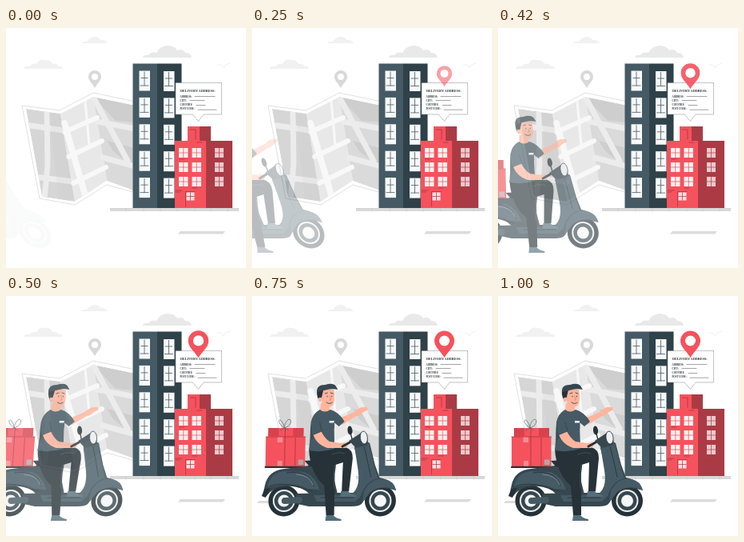
Animation, 300 px wide and 300 px high, one loop 1.04 s. Source, as an HTML page:

```html
<!DOCTYPE html>
<html lang="en">
<head>
<meta charset="utf-8">
<title>Delivery scooter</title>
<style>
  html, body { margin: 0; width: 100%; height: 100%; overflow: hidden; background: #fff; }
  svg { display: block; width: 100vw; height: 100vh; }
  text { font: bold 3px "Liberation Serif", "Noto Serif", serif; fill: #263238; }
  .line { fill: none; stroke-linecap: round; stroke-linejoin: round; }
</style>
</head>
<body>
<svg viewBox="0 0 300 300">
  <!-- sky -->
  <path fill="#f1f1f1" d="M22 51Q24 47 30 48Q33 43 38 45Q42 38 49 40Q56 40 58 45Q63 43 66 48Q70 47 71 51Z"/>
  <path fill="#f1f1f1" d="M94 19Q97 16 101 17Q105 11 111 11Q116 11 118 15Q123 14 127 19Z"/>
  <path fill="#e9e9e9" d="M171 37Q172 33 178 34Q181 29 188 31Q192 23 201 22Q211 22 214 28Q221 25 224 31Q231 31 232 37Z"/>
  <path class="line" stroke="#eee" stroke-width=".9" d="M264 46Q270 45 272 50Q274 45 280 44"/>

  <!-- map -->
  <path fill="#fff" stroke="#d9d9d9" stroke-width=".8" d="M20 97L67 103L109 81L162 92V206L126 196L86 221L42 213Z"/>
  <clipPath id="sheet"><path d="M25 101L68 107L109 86L162 97V204L126 191L86 217L45 211Z"/></clipPath>
  <g clip-path="url(#sheet)">
    <path fill="#d6d6d6" d="M25 101L68 107L86 217L45 211Z"/>
    <path fill="#e8e8e8" d="M68 107L109 86L126 191L86 217Z"/>
    <path fill="#dadada" d="M109 86L162 97V204L126 191Z"/>
    <path fill="#cecece" d="M109 86L162 97V118L137 116ZM126 141L160 150V175L134 154Z"/>
    <g class="line" stroke="#ececec" stroke-width="7">
      <path d="M51 100L52 170L48 215M24 121L72 128M36 186L84 192M109 86L152 166M114 117L162 126M121 162L162 173"/>
    </g>
    <g class="line" stroke="#f8f8f8" stroke-width="6">
      <path d="M73 130L114 112M78 161L120 141M84 194L125 174"/>
      <path stroke-width="8" d="M73 119L99 209"/>
      <path stroke-width="3" d="M99 91L104 146"/>
    </g>
    <path fill="#bbb" fill-opacity=".14" d="M68 107L86 217L66 214L54 105Z"/>
  </g>
  <path fill="#d9d9d9" fill-rule="evenodd" d="M111 75C108 69 103 66 103 61A8 8 0 0 1 119 61C119 66 114 69 111 75ZM111 57A4 4 0 1 0 111 65A4 4 0 1 0 111 57"/>

  <!-- ground -->
  <path fill="#d9d9d9" d="M130 225.5H291V229H130Z"/>
  <path class="line" stroke="#bcbcbc" stroke-width=".5" d="M130 225.5H291M150 226V229M172 226V229M193 226V229M214 226V229M236 226V229M256 226V229M277 226V229"/>
  <path fill="#dcdcdc" d="M218 254H274L271 257.5H215Z"/>

  <!-- buildings -->
  <path fill="#455a64" d="M158.5 44.5H189V225H158.5Z"/>
  <path fill="#2f4149" d="M189 44.5H219.5V225H189Z"/>
  <path fill="#f5525d" d="M211 141H227V123H242V141H250V225H211Z"/>
  <path fill="#aa3b44" d="M242 123H256V141H283V225H250V141H242Z"/>
  <g id="windows"></g>
  <path class="line" stroke="#9c343d" stroke-width=".7" d="M230 127H237V139M239 143H245M224.5 223V204.500H236M212 203H220M212 205H217M217 164H223M233 200H239"/>

  <!-- address card -->
  <path fill="#fff" stroke="#777" stroke-width=".6" stroke-dasharray="1.5 .5" d="M212 68.500H269.500V108H247L240.500 116.500L233 108H212Z"/>
  <text x="218" y="80" style="font-size:4.2px">DELIVERY ADDRESS:</text>
  <text x="217.500" y="87">ADDRESS:</text>
  <text x="217.500" y="92">CITY:</text>
  <text x="217.500" y="97">COUNTRY:</text>
  <text x="217.500" y="102">POST CODE :</text>
  <path class="line" stroke="#666" stroke-width=".6" d="M236 85.500H261M230 90.500H248M238 96.500H249M240 102.200H263"/>

  <g id="pin">
    <path fill="#f5525d" fill-rule="evenodd" d="M240.500 77C236 69 228 64 228 56A12.500 12.500 0 0 1 253 56C253 64 245 69 240.500 77Z"/>
    <circle cx="240.500" cy="56" r="6.500" fill="#fff"/>
  </g>

  <g id="rider">
    <path fill="#dcdcdc" d="M10 256H70L68 259H7Z"/>
    <g id="wheels"></g>

    <!-- parcels -->
    <path fill="#f5525d" d="M17 176H66.500V213H17ZM20 165H64V176H20Z"/>
    <path fill="#d8424d" d="M20 165H33V175H20ZM51 165H64V175H51Z"/>
    <path fill="#f98a91" d="M31.500 176H38V183H31.500ZM32 206H38V213H32Z"/>
    <path fill="#b7a4a8" d="M58 204.500H64.500V211H58Z"/>
    <path class="line" stroke="#a8333d" stroke-width=".8" d="M17 176H66.500M41 165V213M54 177V213M17 213H66"/>
    <path class="line" stroke="#59636a" stroke-width=".7" d="M40 165C31 160 32 152 36 156Q39 159 40 165C40 157 46 151 48 156Q48 162 40 165L35 168M40 165L45 168"/>
    <path class="line" stroke="#263238" stroke-width="2" d="M17 214H70L74 211"/>

    <!-- scooter -->
    <path fill="#37474f" d="M55 247L105 246H128Q139 240 136 220L128 190L137 178L147 184L154 211L160 227Q177 230 181 243Q160 236 147 247L138 260Q135 263 126 263H72L58 260Z"/>
    <path fill="#455a64" d="M128 188L138 181L146 185L153 212L158 228Q143 231 137 250L130 257H82L78 249H122Q137 243 133 218Z"/>
    <path fill="#455a64" d="M141 244Q150 226 167 229Q178 231 181 243Q163 234 149 245L139 258Z"/>
    <path fill="#37474f" d="M14 250L17 236Q21 218 41 216L72 212H99L108 248H73Q62 236 43 238Q28 238 19 250Z"/>
    <path fill="#455a64" d="M20 240Q22 222 40 219L66 220Q80 226 85 242L70 241Q57 234 42 236Q28 236 20 240Z"/>
    <path class="line" stroke="#263238" stroke-width=".8" d="M20 239Q30 233 48 236L76 244M44 221Q73 217 78 238M140 188Q145 207 149 226M87 252H128"/>
    <path class="line" stroke="#839097" stroke-width=".9" d="M56 223Q73 224 77 236"/>
    <path fill="#263238" d="M13 250L17 241L24 240L18 252ZM66 206Q84 204 102 210L103 216L72 213Z"/>
    <path class="line" stroke="#455a64" stroke-width="8" d="M42 256L60 255"/>
    <path class="line" stroke="#263238" stroke-width="1.300" d="M123 172L126 184"/>
    <ellipse cx="122" cy="168" rx="3" ry="5.500" fill="#263238" transform="rotate(-8 122 168)"/>
    <path fill="#37474f" d="M121 181L130 175L139 169Q146 175 144 186L130 190Z"/>
    <ellipse cx="139.500" cy="177" rx="4.500" ry="8" fill="#edf1f2" stroke="#263238" stroke-width=".8" transform="rotate(-8 139.500 177)"/>

    <!-- far arm and leg -->
    <path fill="#ffb59d" d="M106 154L112 161L130 150Q135 149 137 146L144 142L143 139Q136 138 132 141L127 145Z"/>
    <path fill="#263238" d="M90 191L116 189Q126 191 126 203L122 244H113L114 208L92 215Z"/>
    <path fill="#546e7a" d="M112 244H121Q124 248 131 249V251H111Z"/>

    <!-- near leg -->
    <path fill="#263238" d="M71 191L103 189Q107 203 104 222V274H94L91 237Q73 222 71 191Z"/>
    <path class="line" stroke="#53626a" stroke-width=".6" d="M100 198Q109 194 116 197M104 211Q102 224 103 240"/>
    <path fill="#546e7a" d="M94 274H103Q106 278 113 279V281H93Z"/>

    <!-- body -->
    <path fill="#ffb59d" d="M85 134H96V145Q90 149 84 144Z"/>
    <path fill="#455a64" d="M84 142Q90 147 97 142Q108 145 115 157L108 163L102 158L103 191Q87 196 71 193L73 168Q71 149 84 142Z"/>
    <path fill="#3a4d56" d="M75 153Q71 166 73 181L84 170Z"/>
    <path fill="#ffb59d" d="M75 170L85 167Q90 178 97 182L112 184Q117 182 119 185Q121 188 116 190L94 190Q79 185 75 170Z"/>
    <path fill="#455a64" d="M73 157Q80 148 84 159L87 169L75 174Z"/>
    <path fill="#fff" d="M96 156H102V158.500H96Z"/>
    <path class="line" stroke="#263238" stroke-width="3" d="M113 188L122 183"/>
    <path class="line" stroke="#2d3c44" stroke-width=".6" d="M84 158L87 169L75 174M102 158V165"/>

    <!-- head -->
    <path fill="#ffb59d" d="M83 117H101Q103 128 101 135Q97 141 91 138Q84 135 83 117Z"/>
    <path fill="#263238" d="M80 117H88L86 126L84 132Q79 127 80 117Z"/>
    <circle cx="84" cy="129" r="2.300" fill="#ffb59d"/>
    <path fill="#37474f" d="M80 120Q79 111 90 111Q99 108 103 112L106 117Q98 115 89 118Z"/>
    <path class="line" stroke="#263238" stroke-width=".8" d="M90 122L93 121M97 121L100 122M93 125V126M98.500 125V126M92 133Q96 136 99 133"/>
    <path class="line" stroke="#d8745f" stroke-width=".7" d="M96 125L97.500 130H95.500"/>
  </g>
</svg>
<script>
const $ = id => document.getElementById(id);

const pane = (x, y, w, h, fill, bar) =>
  `<rect x="${x}" y="${y}" width="${w}" height="${h}" fill="${fill}"/>
   <path stroke="${bar}" stroke-width=".7" fill="none" d="M${x + w / 2} ${y}v${h}M${x} ${y + h / 2}h${w}"/>`;

const tallPane = (x, y) =>
  `<rect x="${x}" y="${y}" width="13.500" height="25" fill="#f8fafa"/>
   <path stroke="#455a64" stroke-width=".8" fill="none" d="M${x + 6.5} ${y + 1}v18M${x + 2} ${y + 9}h9M${x + 1} ${y + 18.5}h11"/>`;

let panes = "";
for (let i = 0; i < 5; i++) {
  const y = 53.5 + i * 33.4;
  panes += tallPane(166.5, y) + tallPane(197, y + .5);
}
for (let i = 0; i < 3; i++) {
  const y = 150 + i * 18;
  for (const x of [216, 232.5]) panes += pane(x, y, 11.5, 12, "#fff0f0", "#d94b55");
  panes += pane(261, y, 11, 12, "#ecc9cd", "#aa3b44");
}
$("windows").innerHTML = panes + pane(225.5, 205.5, 10, 10, "#fbe0e1", "#9c343d");

$("wheels").innerHTML = [41, 161.5].map(x =>
  [[19.5, "#263238"], [14, "#eceff0"], [12, "#37474f"], [7.5, "#f5f6f6"]].map(([r, fill]) =>
    `<circle cx="${x}" cy="256" r="${r}" fill="${fill}"/>`).join("")).join("");

const LOOP = 1040, STEP = 1000 / 24, PIVOT = 195;

// Linear interpolation through [time, value] pairs
function track(t, keys) {
  const i = keys.findIndex(k => k[0] > t);
  if (i < 0) return keys[keys.length - 1][1];
  const [t0, a] = keys[i - 1], [t1, b] = keys[i];
  return a + (b - a) * (t - t0) / (t1 - t0);
}

function draw(ms) {
  const t = Math.min(24, Math.floor((ms + 5.01) / STEP)) * STEP;

  // The rider rushes in leaning, then sways upright
  const enter = Math.max(.02, Math.min(1, t / 600) ** 1.3);
  const lean = t < 600 ? 20 - 30 * enter : track(t, [[600, -10], [800, 2], [1000, 0]]);
  const skew = Math.tan(lean * Math.PI / 180);
  $("rider").setAttribute("transform", `matrix(1 0 ${skew} 1 ${-150 * (1 - enter) - PIVOT * skew} 0)`);
  $("rider").setAttribute("opacity", enter);

  const grow = track(t, [[0, 0], [167, .33], [333, .76], [500, 1.04], [710, 1]]);
  $("pin").setAttribute("transform", `translate(240.500 60) scale(${.5 + grow / 2}) translate(-240.500 -60)`);
  $("pin").setAttribute("opacity", Math.min(1, grow));
}

function tick() {
  draw(performance.now() % LOOP);
  requestAnimationFrame(tick);
}
tick();
</script>
</body>
</html>
```
